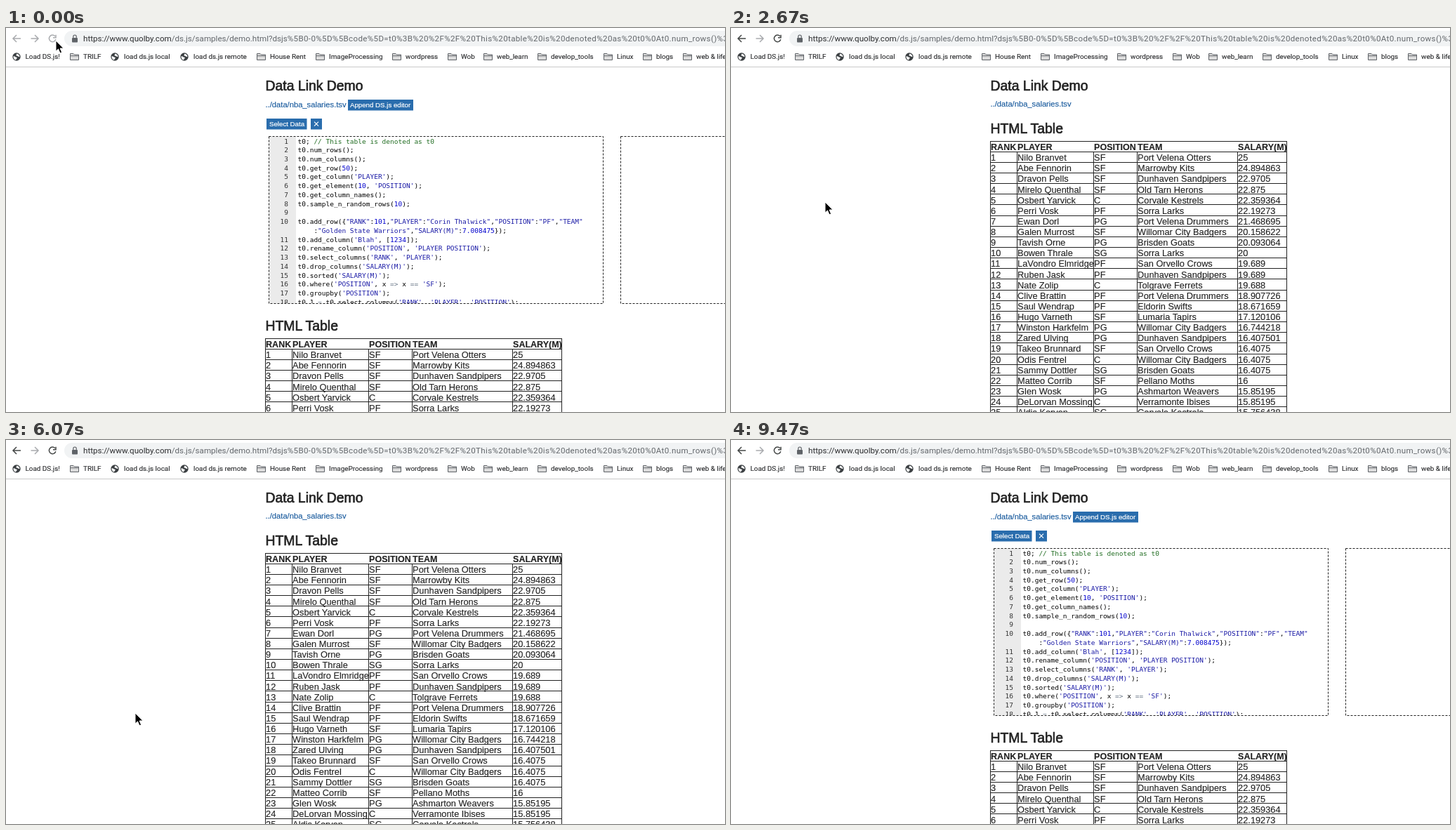
An HTML page that plays this animation: 1024 px wide and 547 px high, repeating every 9540 ms.

```html
<!DOCTYPE html>
<html lang="en">
<head>
<meta charset="utf-8">
<title>Data Link Demo</title>
<style>
  html, body { margin: 0; width: 100%; height: 100%; overflow: hidden; background: #fff; }
  svg { display: block; width: 1024px; height: 547px; }
  text { white-space: pre; }
  .ui { font-family: Roboto, sans-serif; fill: #2b2c2e; }
  .mark { font-size: 9.9px; stroke: #2b2c2e; stroke-width: .15; }
  .path { fill: #63676b; }
  .page { font-family: "Liberation Sans", Arial, sans-serif; fill: #222; }
  .code { font: 9.5px "DejaVu Sans Mono", monospace; fill: #000; }
  .title { font-size: 19.4px; stroke: #222; stroke-width: .65; }
  .link { font-size: 11.2px; fill: #17599c; stroke: #17599c; stroke-width: .15; }
  .button { font-size: 9.7px; fill: #fff; stroke: #fff; stroke-width: .2; }
  .cell { font-size: 12.8px; stroke: #222; stroke-width: .12; }
  .head { font-size: 12.5px; font-weight: bold; }
  .grid { stroke: #222; fill: none; }
  .icon { fill: none; stroke-width: 1.5; }
  .comment { fill: #236e24; }
  .string { fill: #1a1aa6; }
  .number { fill: #0000cd; }
  .operator { fill: #687687; }
</style>
</head>
<body>
<svg id="stage" viewBox="0 0 1024 547" xmlns="http://www.w3.org/2000/svg"></svg>
<script>
const LOOP = 9540;
const EDITOR_SHIFT = 281;

const bookmarks = [
  [9, "globe", "Load DS.js!"], [91, "folder", "TRILF"], [149, "globe", "load ds.js local"],
  [248, "globe", "load ds.js remote"], [357, "folder", "House Rent"],
  [441, "folder", "ImageProcessing"], [550, "folder", "wordpress"], [629, "folder", "Wob"],
  [680, "folder", "web_learn"], [757, "folder", "develop_tools"], [851, "folder", "Linux"],
  [907, "folder", "blogs"], [964, "folder", "web & life"]
];

const columns = [369.5, 407.5, 516.5, 578.5, 721.5, 791.5];
const header = ["RANK", "PLAYER", "POSITION", "TEAM", "SALARY(M)"];
const players = `Nilo Branvet|SF|Port Velena Otters|25
Abe Fennorin|SF|Marrowby Kits|24.894863
Dravon Pells|SF|Dunhaven Sandpipers|22.9705
Mirelo Quenthal|SF|Old Tarn Herons|22.875
Osbert Yarvick|C|Corvale Kestrels|22.359364
Perri Vosk|PF|Sorra Larks|22.19273
Ewan Dorl|PG|Port Velena Drummers|21.468695
Galen Murrost|SF|Willomar City Badgers|20.158622
Tavish Orne|PG|Brisden Goats|20.093064
Bowen Thrale|SG|Sorra Larks|20
LaVondro Elmridge|PF|San Orvello Crows|19.689
Ruben Jask|PF|Dunhaven Sandpipers|19.689
Nate Zolip|C|Tolgrave Ferrets|19.688
Clive Brattin|PF|Port Velena Drummers|18.907726
Saul Wendrap|PF|Eldorin Swifts|18.671659
Hugo Varneth|SF|Lumaria Tapirs|17.120106
Winston Harkfelm|PG|Willomar City Badgers|16.744218
Zared Ulving|PG|Dunhaven Sandpipers|16.407501
Takeo Brunnard|SF|San Orvello Crows|16.4075
Odis Fentrel|C|Willomar City Badgers|16.4075
Sammy Dottler|SG|Brisden Goats|16.4075
Matteo Corrib|SF|Pellano Moths|16
Glen Wosk|PG|Ashmarton Weavers|15.85195
DeLorvan Mossing|C|Verramonte Ibises|15.85195
Aldis Korven|SG|Corvale Kestrels|15.756438`.split("\n");

// A line that starts with spaces continues the one above.
const source = `t0; // This table is denoted as t0
t0.num_rows();
t0.num_columns();
t0.get_row(50);
t0.get_column('PLAYER');
t0.get_element(10, 'POSITION');
t0.get_column_names();
t0.sample_n_random_rows(10);

t0.add_row({"RANK":101,"PLAYER":"Corin Thalwick","POSITION":"PF","TEAM"
    :"Golden State Warriors","SALARY(M)":7.008475});
t0.add_column('Blah', [1234]);
t0.rename_column('POSITION', 'PLAYER POSITION');
t0.select_columns('RANK', 'PLAYER');
t0.drop_columns('SALARY(M)');
t0.sorted('SALARY(M)');
t0.where('POSITION', x => x == 'SF');
t0.groupby('POSITION');
t0_1 = t0.select_columns('RANK', 'PLAYER', 'POSITION');`.split("\n");

const escapeText = s => s.replace(/&/g, "&amp;").replace(/</g, "&lt;").replace(/>/g, "&gt;");
const text = (x, y, content, cls = "", extra = "") =>
  `<text x="${x}" y="${y}" class="${cls}" ${extra}>${escapeText(content)}</text>`;
const rect = (x, y, w, h, fill, extra = "") =>
  `<rect x="${x}" y="${y}" width="${w}" height="${h}" fill="${fill}" ${extra}/>`;

const icons = {
  globe: x => `<g transform="translate(${x + 6} 41)"><circle r="5.7" fill="#3c4043"/>
    <path d="M-4.5-.5C-2-1.5-2 1 0 .8S-.5 4-1.5 4.5C-3.5 3.5-4.5 2-4.5-.5ZM.5-4.6C3-4 4.5-2 4.4-.3 3 .8 2.5-1 .8-1.2S-.8-2.5.5-4.6Z" fill="#fff"/></g>`,
  folder: x => `<path d="M${x + .5} 45.5V36.5h4.5l1.5 1.5h6v7.5ZM${x + .5} 39.7h12" fill="#dcdcdc" stroke="#5f6368"/>`
};

function toolbar() {
  const items = bookmarks.map(([x, kind, label]) =>
    icons[kind](x) + text(x + (x === 9 ? 18.5 : 19), 44.3, label, "ui mark"));
  return `
    ${rect(83, 4, 960, 22, "#f1f3f4", 'rx="11"')}
    <g class="icon" stroke="#a9abae">
      <path d="M35.5 15H46M41 10l5 5-5 5"/>
      <g id="nav">
        <path d="M21 15H10.5M15 10l-5 5 5 5"/>
        <path d="M69.8 11.7A4.8 4.8 0 1 0 70.8 16.3M71 9.8v4h-4"/>
      </g>
    </g>
    ${rect(94, 14, 8, 6.5, "#5f6368", 'rx="1"')}
    <path d="M95.8 14v-1.8a2.2 2.2 0 0 1 4.4 0V14" fill="none" stroke="#5f6368" stroke-width="1.2"/>
    <text x="110" y="19" class="ui" font-size="11.6">https://www.quolby.com<tspan
      class="path">/ds.js/samples/demo.html?dsjs</tspan><tspan class="path" letter-spacing=".33"
      >%5B0-0%5D%5Bcode%5D=t0%3B%20%2F%2F%20This%20table%20is%20denoted%20as%20t0%0At0.num_rows()%3B</tspan></text>
    ${rect(4, 30, 78, 22, "#e7e7e8", 'rx="11" id="pill"')}
    ${items.join("")}
    ${rect(0, 55, 1024, 1, "#c9c9c9")}`;
}

function highlight(line) {
  const rules = /(\/\/.*)|('[^']*'|"[^"]*")|(\b\d[\d.]*\b)|(=>|==?)/g;
  const kinds = ["comment", "string", "number", "operator"];
  return line.replace(rules, (match, ...groups) =>
    `<tspan class="${kinds[groups.findIndex(g => g !== undefined)]}">${escapeText(match)}</tspan>`);
}

function editor() {
  let number = 0;
  const lines = source.map((line, i) => {
    const y = 164.5 + i * 12.74;
    const label = line.startsWith(" ") ? "" : text(402, y, String(++number), "", 'text-anchor="end" fill="#333"');
    return `${label}<text x="415.5" y="${y}">${highlight(line)}</text>`;
  });
  const dashed = 'stroke="#222" stroke-dasharray="3 2"';
  return `
    ${rect(487, 102, 93, 15.5, "#2a6dad")}${text(490, 113.3, "Append DS.js editor", "page button")}
    ${rect(371, 129, 57.5, 15.5, "#2a6dad")}${text(375, 140.2, "Select Data", "page button")}
    ${rect(434, 129, 16, 15.5, "#2a6dad")}
    <path d="M439 133.7l6 6m0-6l-6 6" stroke="#fff" stroke-width="1.2"/>
    <clipPath id="pane"><rect x="375" y="155" width="475" height="237"/></clipPath>
    <g class="code" clip-path="url(#pane)">${rect(375, 155, 38, 237, "#ebebeb")}${lines.join("")}</g>
    ${rect(374.5, 154.5, 476, 238, "none", dashed)}
    ${rect(875.5, 154.5, 476, 238, "none", dashed)}`;
}

function table() {
  const rowTop = i => Math.round(160.5 + i * 15.15) + .5;
  const baseline = i => 174 + i * 15.13;
  const rows = [header, ...players.map((p, i) => [String(i + 1), ...p.split("|")])];
  const cells = rows.map((row, i) => row.map((value, c) =>
    text(columns[c] + .6, baseline(i), value, i ? "page cell" : "page cell head")).join(""));
  const across = rows.map((_, i) => `M369 ${rowTop(i)}H792`).join("");
  const down = columns.map((x, c) =>
    `M${x} ${c === 0 || c === 5 ? rowTop(0) : rowTop(1)}V560`).join("");
  return text(369.5, 149.5, "HTML Table", "page title") +
    cells.join("") + `<path class="grid" d="${across}${down}"/>`;
}

document.getElementById("stage").innerHTML = `
  ${rect(0, 0, 1024, 547, "#fff")}
  ${toolbar()}
  ${text(369.5, 89.2, "Data Link Demo", "page title")}
  <g id="link">${text(369.5, 112, "../data/nba_salaries.tsv", "page link")}</g>
  <g id="editor">${editor()}</g>
  <g id="table">${table()}</g>
  <path id="arrow" d="M0 0V15.2L3.5 11.9 6 17.8 8.6 16.7 6.1 11H11Z" fill="#000" stroke="#fff"/>
  <g id="beam" fill="none">
    <path d="M-3-8.5Q0-8.5 0-6Q0-8.5 3-8.5M0-6V6M-3 8.5Q0 8.5 0 6Q0 8.5 3 8.5M-1.5 3h3" stroke="#111" stroke-width="1.2"/>
  </g>`;

// Each step is [ms, value]; the last value holds until the loop ends.
function play(id, property, steps, easing) {
  const frames = [...steps, [LOOP, steps[steps.length - 1][1]]].map(([ms, value]) =>
    ({ offset: ms / LOOP, [property]: value, easing }));
  document.getElementById(id).animate(frames, { duration: LOOP, iterations: Infinity });
}
const HARD = "steps(1, end)";
const at = (x, y) => `translate(${x}px, ${y}px)`;
const path = points => points.map(([ms, x, y]) => [ms, at(x, y)]);

play("arrow", "transform", path([
  [0, 71, 18], [350, 71, 18], [850, 63, 41], [1250, 63, 41], [1750, 66, 13], [2150, 66, 13],
  [2620, 134, 248], [3200, 134, 248], [3950, 44, 37], [4600, 42, 35], [4900, 42, 35],
  [5750, 184, 389], [6250, 184, 389], [6750, 569, 293]
]), "ease-in-out");
play("beam", "transform", path([[0, 569, 293], [6250, 184, 389], [6750, 569, 293]]), "ease-in-out");
play("arrow", "opacity", [[0, 1], [6500, 0]], HARD);
play("beam", "opacity", [[0, 0], [6500, 1], [7100, 0]], HARD);
play("nav", "stroke", [[0, "#a9abae"], [350, "#444746"]], HARD);
play("pill", "opacity", [[0, 0], [4060, 0], [4180, 1], [4950, 1], [5080, 0]], "linear");
play("editor", "opacity", [[0, 1], [2300, 0], [6400, 1]], HARD);
play("link", "transform", [[0, at(0, 1)], [2300, at(0, 0)], [6400, at(0, 1)]], HARD);
play("table", "transform", [[0, at(0, EDITOR_SHIFT)], [2300, at(0, 0)], [6400, at(0, EDITOR_SHIFT)]], HARD);
</script>
</body>
</html>
```
